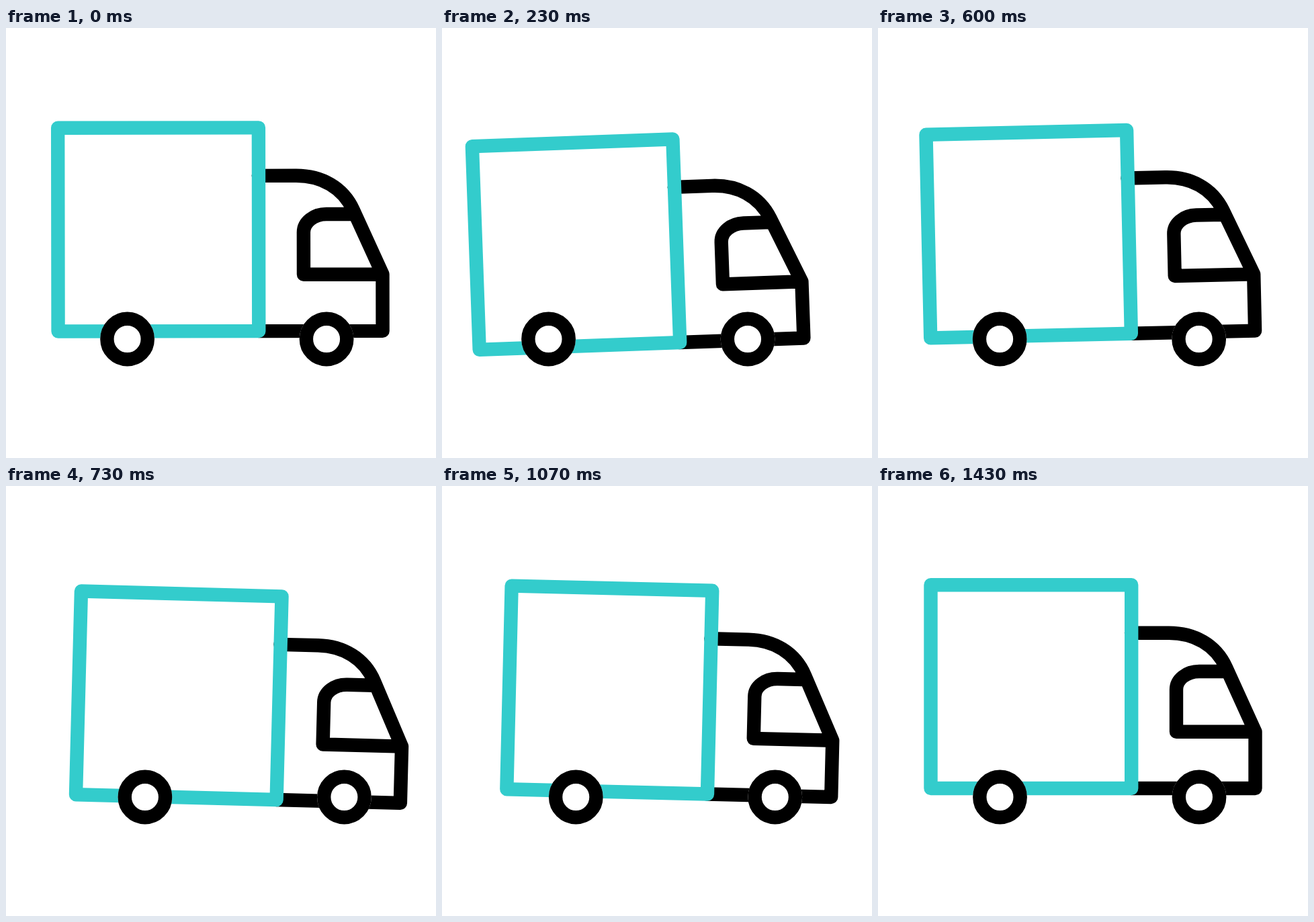
These frames come from a looping animation (640x640 px, 1.67 s). An HTML page with a canvas:

```html
<!DOCTYPE html>
<html lang="en">
<head>
<meta charset="utf-8">
<title>Truck</title>
<style>
  html, body { margin: 0; width: 100%; height: 100%; overflow: hidden; background: #fff; }
  canvas { display: block; width: 100vmin; height: 100vmin; }
</style>
</head>
<body>
<canvas id="stage" width="640" height="640"></canvas>
<script>
const ctx = document.getElementById('stage').getContext('2d');
const LOOP = 1670;
const STEP = 100 / 3;
const LAST_STEP = 44;
const LINE = 20.4;
const PIVOT = { x: 320, y: 450 };
const WHEELS = { xs: [181.5, 478], y: 463, radius: 30.2 };

// Keys are [step, value] pairs, eased in and out between neighbours.
const shift = [[-0.3, 0], [12.8, -33], [24.8, 29.2], [44, 0]];
const bounce = [[-0.3, 0], [8.4, 20.2], [16.7, 3.5], [25.5, 18.5], [38.5, 0]];
const tilt = [[-0.3, 0], [14.6, -3.5], [24.5, 1.83], [28, 1.8], [44, 0]];

const cab = new Path2D(
  'M377 218.7 H433 C470.5 218.7 502.5 236 518 270 L561.5 365.7 V450 H377' +
  'M517 276 H478 C459 276 444 288 444 303 V365.7 H561.5');
const box = new Path2D('M78.5 147.2 H377.2 V450 H78.5 Z');

function valueAt(keys, step) {
  const next = keys.findIndex(([at]) => at > step);
  if (next < 0) return keys[keys.length - 1][1];
  const [t0, v0] = keys[next - 1];
  const [t1, v1] = keys[next];
  const u = (step - t0) / (t1 - t0);
  return v0 + (v1 - v0) * u * u * (3 - 2 * u);
}

function strokePath(path, color) {
  ctx.strokeStyle = color;
  ctx.stroke(path);
}

function drawWheel(x) {
  const { y, radius } = WHEELS;
  ctx.beginPath();
  ctx.arc(x, y, radius + LINE / 2, 0, Math.PI * 2);
  ctx.fillStyle = '#fff';
  ctx.fill();
  const ring = new Path2D();
  ring.arc(x, y, radius, 0, Math.PI * 2);
  strokePath(ring, '#000');
}

function draw(now) {
  const time = now % LOOP;
  const step = Math.min(LAST_STEP, 1 + Math.floor((time + 5) / STEP));
  const dx = valueAt(shift, step);

  ctx.fillStyle = '#fff';
  ctx.fillRect(0, 0, 640, 640);
  ctx.lineWidth = LINE;
  ctx.lineCap = ctx.lineJoin = 'round';

  ctx.save();
  ctx.translate(PIVOT.x + dx, PIVOT.y + valueAt(bounce, step));
  ctx.rotate(valueAt(tilt, step) * Math.PI / 180);
  ctx.translate(-PIVOT.x, -PIVOT.y);
  strokePath(cab, '#000');
  strokePath(box, '#33cccc');
  ctx.restore();

  WHEELS.xs.forEach(x => drawWheel(x + dx));
}

const start = performance.now();
function tick() {
  draw(performance.now() - start);
  requestAnimationFrame(tick);
}
tick();
</script>
</body>
</html>
```
